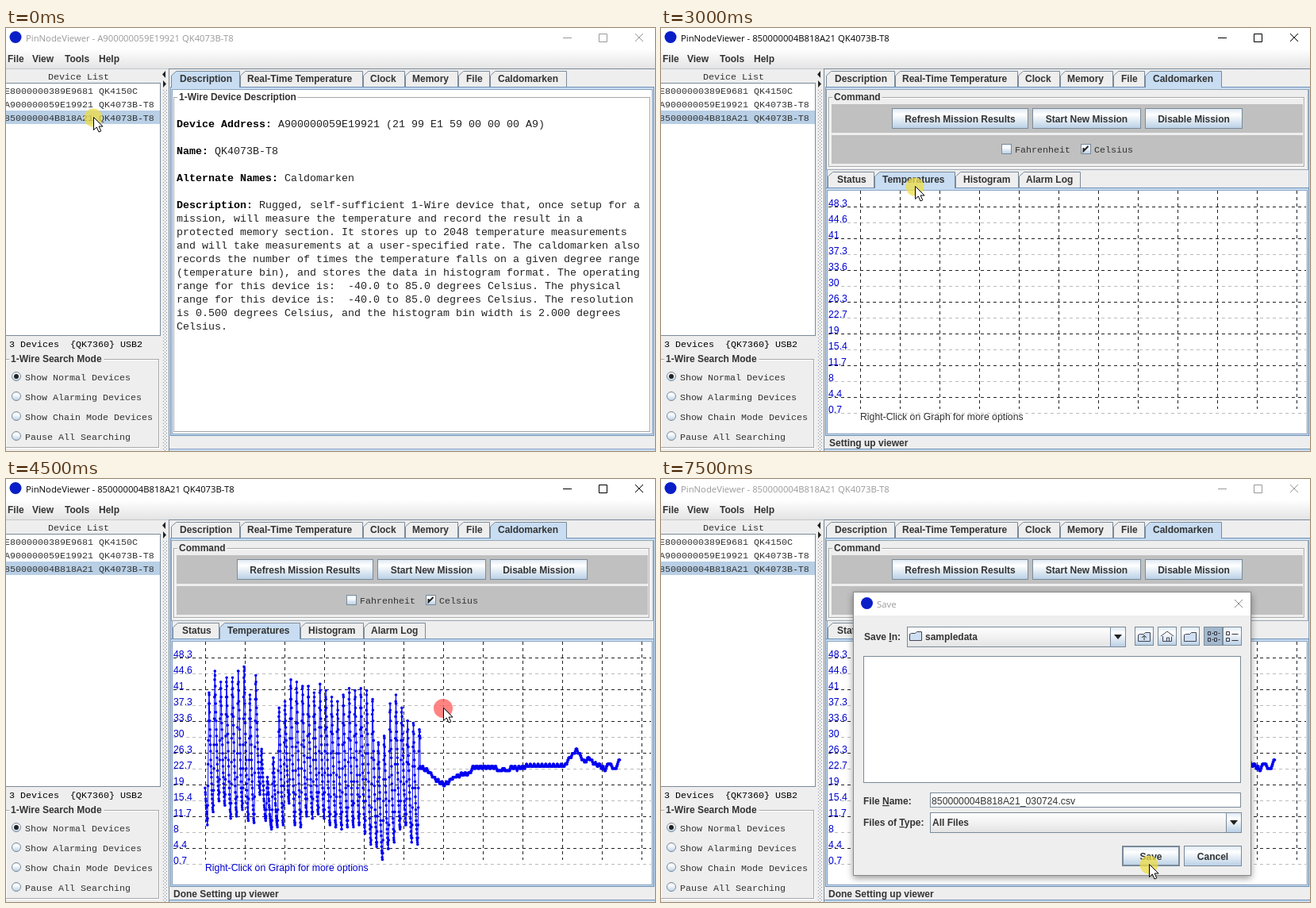
An HTML page that plays this animation: 818 px wide and 533 px high, repeating every 8 s.

```html
<!DOCTYPE html>
<html lang="en">
<head>
<meta charset="utf-8">
<title>Device viewer</title>
<style>
  html, body { margin: 0; width: 100%; height: 100%; overflow: hidden; background: #eee; }
  svg { display: block; }
  text { white-space: pre; fill: #333; font: bold 12px "Liberation Sans", Arial, sans-serif; }
  .plain { font-weight: normal; font-size: 12.25px; }
  .mono { font: 11.667px "Liberation Mono", "Courier New", monospace; }
  .cell { font: bold 11.667px "Liberation Mono", "Courier New", monospace; fill: #000; text-anchor: end; }
  .doc { font: 13.333px "Liberation Mono", "Courier New", monospace; fill: #222; }
  .doc .b { font-weight: bold; fill: #000; }
  .title { font: 11.3px "Open Sans", "Noto Sans", sans-serif; fill: #000; }
  .dim { fill: #999; }
  .dark { fill: #000; }
  .blue { fill: #0000d0; }
  .mid { text-anchor: middle; }
  .legend { stroke: #eee; stroke-width: 5px; paint-order: stroke; }
  .paper { stroke: #fff; }
  .crisp { shape-rendering: crispEdges; }
</style>
</head>
<body>
<svg id="stage" width="818" height="533" viewBox="0 0 818 533">
  <defs>
    <linearGradient id="metal" x2="0" y2="1">
      <stop offset="0" stop-color="#dde8f3"/><stop offset=".3" stop-color="#fff"/><stop offset="1" stop-color="#b8cfe5"/>
    </linearGradient>
    <linearGradient id="bar" x2="0" y2="1">
      <stop offset="0" stop-color="#fff"/><stop offset="1" stop-color="#e4e4e4"/>
    </linearGradient>
    <pattern id="grip" width="4" height="4" patternUnits="userSpaceOnUse">
      <path d="M0 0h1v1h-1zM2 2h1v1h-1z" fill="#8494a4"/>
    </pattern>
    <filter id="shadow" x="-10%" y="-10%" width="120%" height="120%">
      <feDropShadow dx="0" dy="3" stdDeviation="4" flood-opacity=".4"/>
    </filter>
  </defs>
</svg>
<script>
const LOOP = 8000, EDGE = '#7a8a99', SKY = '#c8ddf2', GRAY = '#c0c0c0';
const APP = 'PinNodeViewer', MODEL = 'QK4073B-T8', KIND = 'Caldomarken';
const times = (n, fn) => Array.from({ length: n }, (_, i) => fn(i)).join('');

// Drawing helpers; each returns SVG markup.
const text = (x, y, str, cls = '') => `<text x="${x}" y="${y}" class="${cls}">${str}</text>`;
const fill = (x, y, w, h, color) =>
  `<rect class="crisp" x="${x}" y="${y}" width="${w}" height="${h}" fill="${color}"/>`;
const box = (x, y, w, h, color = 'none', edge = EDGE) =>
  `<rect x="${x + .5}" y="${y + .5}" width="${w - 1}" height="${h - 1}" fill="${color}" stroke="${edge}"/>`;
const path = (d, stroke, color = 'none', extra = '') =>
  `<path d="${d}" stroke="${stroke}" fill="${color}" ${extra}/>`;
const disc = (x, y, r, color, edge = 'none') =>
  `<circle cx="${x}" cy="${y}" r="${r}" fill="${color}" stroke="${edge}"/>`;
const layer = (from, to, ...parts) => `<g data-span="${from} ${to}">${parts.join('')}</g>`;

const button = (x, y, w, h, label) =>
  box(x, y, w, h, 'url(#metal)') + text(x + w / 2, y + h / 2 + 5, label, 'mid');

const titled = (x, y, w, h, label, cls = '') =>
  box(x + 1, y + 1, w, h, 'none', '#fff') + box(x, y, w, h, 'none', '#a8a8a8') +
  text(x + 7, y + 4, label, 'legend ' + cls);

const tab = (x, y, w, label, textX, on) =>
  path(`M${x + .5} ${y + 20}v-14l6 -5.5h${w - 7}v19.5`, EDGE, on ? SKY : '#eee') +
  text(textX, y + 14, label);

const tabRow = (y, tabs, active) =>
  tabs.map(([x, w, label, textX], i) => tab(x, y, w, label, textX, i === active)).join('');

const pane = (x, y, w, h, color) =>
  box(x, y, w, h, SKY, '#6f8fb5') + box(x + 2, y + 3, w - 4, h - 5, color, '#8aa4c2');

const pointer = (x, y, halo = 'rgba(238,220,70,.75)', r = 11.5) =>
  disc(x, y + 1, r, halo) +
  path(`M${x + .5} ${y + .5}v16l3.8 -3.5l2.7 6l2.8 -1.2l-2.7 -5.8h5z`, '#000', '#fff');

const windowTitle = (device, cls, ink) =>
  text(25, 17, `${APP} - ${device} ${MODEL}`, 'title ' + cls) +
  path('M702 12.5h11M747.5 7.5h10v10h-10zM793 7l10 10M803 7l-10 10', ink);

const mainTabs = [
  [208, 87, 'Description', 219], [295, 155, 'Real-Time Temperature', 304], [450, 53, 'Clock', 459],
  [503, 67, 'Memory', 512], [570, 40, 'File', 580], [610, 97, KIND, 620]];
const subTabs = [
  [210, 59, 'Status', 222], [269, 102, 'Temperatures', 279],
  [371, 80, 'Histogram', 381], [451, 78, 'Alarm Log', 460]];

function frame() {
  const menu = [[2, 'File'], [33, 'View'], [74, 'Tools'], [117, 'Help']];
  const devices = ['E8000000389E9681 QK4150C', `A900000059E19921 ${MODEL}`, `850000004B818A21 ${MODEL}`];
  const modes = ['Show Normal Devices', 'Show Alarming Devices', 'Show Chain Mode Devices', 'Pause All Searching'];
  return [
    fill(0, 0, 818, 533, '#eee'), fill(0, 0, 818, 26, '#fff'), disc(12, 11.5, 7.5, '#0a1ec8'),
    fill(0, 26, 818, 25, 'url(#bar)'), fill(0, 51, 818, 1, '#c4c8cc'),
    ...menu.map(([x, label]) => text(x, 43, label)),
    text(53, 65, 'Device List', 'mono'),
    box(-2, 69, 197, 319, '#fff'), fill(0, 104, 194, 17, '#b8cfe5'),
    ...devices.map((name, i) => text(-2, 83 + 17 * i, name, 'mono')),
    text(4, 402, '3 Devices  {QK7360} USB2', 'mono dark'),
    titled(-1, 417, 194, 112, '1-Wire Search Mode'),
    ...modes.map((label, i) =>
      disc(13, 439 + 25 * i, 5.5, 'url(#metal)', EDGE) + text(24, 444 + 25 * i, label, 'mono')),
    disc(13, 439, 3, '#222'),
    fill(197, 78, 7, 455, 'url(#grip)'),
    path('M201 54v9l-4 -4.5zM198 66v9l4 -4.5z', 'none', '#222'),
    fill(205, 51, 613, 1, EDGE), fill(205, 51, 1, 482, EDGE), fill(206, 530, 612, 1, '#8aa4c2'),
    fill(206, 531, 612, 2, SKY)
  ].join('');
}

function description() {
  const lines = [
    ['Device Address:', ' A900000059E19921 (21 99 E1 59 00 00 00 A9)'], [],
    ['Name:', ` ${MODEL}`], [],
    ['Alternate Names:', ` ${KIND}`], [],
    ['Description:', ' Rugged, self-sufficient 1-Wire device that, once setup for a'],
    ['', 'mission, will measure the temperature and record the result in a'],
    ['', 'protected memory section. It stores up to 2048 temperature measurements'],
    ['', `and will take measurements at a user-specified rate. The ${KIND.toLowerCase()} also`],
    ['', 'records the number of times the temperature falls on a given degree range'],
    ['', '(temperature bin), and stores the data in histogram format. The operating'],
    ['', 'range for this device is:  -40.0 to 85.0 degrees Celsius. The physical'],
    ['', 'range for this device is:  -40.0 to 85.0 degrees Celsius. The resolution'],
    ['', 'is 0.500 degrees Celsius, and the histogram bin width is 2.000 degrees'],
    ['', 'Celsius.']];
  return pane(207, 74, 610, 440, '#fff') + tabRow(54, mainTabs, 0) + fill(209, 74, 85, 2, SKY) +
    titled(211, 87, 601, 422, '1-Wire Device Description', 'paper') +
    lines.map(([head, body], i) => head === undefined ? '' :
      text(215, 125 + 17 * i, `<tspan class="b">${head}</tspan>${body}`, 'doc')).join('');
}

function commands() {
  return pane(207, 74, 612, 457, '#eee') + tabRow(54, mainTabs, 5) + fill(611, 74, 95, 2, SKY) +
    fill(206, 514, 612, 16, '#eee') +
    box(208, 77, 608, 102, '#eee', '#9aa8b6') + titled(211, 87, 600, 88, 'Command') +
    fill(215, 96, 594, 36, GRAY) + fill(215, 135, 594, 36, GRAY) +
    button(291, 101, 172, 26, 'Refresh Mission Results') +
    button(468, 101, 137, 26, 'Start New Mission') +
    button(610, 101, 123, 26, 'Disable Mission') +
    box(429, 146, 13, 13, 'url(#metal)') + text(446, 157, 'Fahrenheit', 'mono') +
    box(529, 146, 13, 13, 'url(#metal)') + text(546, 157, 'Celsius', 'mono') +
    path('M532.5 151v4l6 -6', '#222', 'none', 'stroke-width="2"') +
    pane(207, 201, 610, 313, '#eee');
}

function statusTable() {
  const labels = ['Is Mission Active?', 'Mission Start:', 'Sample Rate:', 'Number of Mission Samples:',
    'Total Samples:', 'Roll Over Enabled?', 'Roll Over Occurred?', 'Active Alarms:',
    'Next Clock Alarm At:', 'High Temperature Alarm:', 'Low Temperature Alarm:'];
  return tabRow(181, subTabs, 0) + fill(211, 201, 57, 2, SKY) +
    box(210, 206, 603, 304, '#eee', '#aaa') +
    labels.map((label, i) => {
      const y = 210 + 27 * i;
      return fill(211, y, 299, 24, GRAY) + fill(513, y, 299, 24, GRAY) + text(503, y + 17, label, 'cell');
    }).join('');
}

function graph() {
  const dash = 'stroke-dasharray="4 4"';
  return tabRow(181, subTabs, 1) + fill(270, 201, 100, 2, SKY) + fill(211, 205, 602, 305, '#fff') +
    times(14, i => path(`M211 ${225.5 + 20 * i}H813`, i % 2 ? '#bbb' : '#222', 'none', dash)) +
    times(12, i => path(`M${251.5 + 50 * i} 205V480`, '#222', 'none', dash)) +
    times(14, i => {
      const label = String(+(48.275 - 3.657 * i).toFixed(1));
      return text(211, 225 + 20 * i, label, 'plain blue');
    });
}

// Daily swings (fast rise, slower fall), then a calm stretch; readings step by half a degree.
function readings() {
  const peaks = [268, 241, 254, 250, 249, 238, 235, 271, 247, 340, 375, 349, 288, 280, 252, 256, 258, 258, 268,
    259, 266, 274, 277, 269, 263, 267, 263, 267, 275, 330, 322, 283, 271, 288, 303, 305, 314];
  const lows = [435, 421, 406, 412, 427, 424, 417, 430, 435, 397, 430, 441, 438, 437, 410, 437, 440, 425, 428,
    424, 428, 436, 440, 442, 440, 438, 436, 447, 460, 463, 480, 468, 459, 442, 437, 458, 460];
  const calm = [[522, 363], [528, 366], [534, 370], [540, 377], [546, 382], [552, 385], [557, 383], [563, 377],
    [572, 373], [584, 371], [589, 363], [616, 363], [622, 369], [627, 365], [632, 369], [637, 363], [645, 365],
    [655, 362], [704, 362], [708, 355], [713, 349], [719, 341], [724, 349], [729, 357], [735, 351], [741, 359],
    [749, 361], [755, 367], [760, 358], [767, 367], [771, 359], [774, 352]];
  const period = 7.36, rise = 2.2, step = 2.73;
  const level = x => {
    if (x >= 522) {
      const i = Math.max(1, calm.findIndex(p => p[0] >= x));
      const [x0, y0] = calm[i - 1], [x1, y1] = calm[i];
      return y0 + (y1 - y0) * (x - x0) / (x1 - x0) + 1.5 * Math.sin(x * 1.3);
    }
    const pos = x - 256 + rise, day = Math.floor(pos / period), part = pos - day * period;
    if (day < 0) return 390 + 45 * (x - 251) / 2.8;
    if (part < rise) {
      const u = part / rise;
      return lows[day] + (peaks[day] - lows[day]) * u * u * (3 - 2 * u);
    }
    const u = (part - rise) / (period - rise), low = lows[day + 1] ?? 363;
    return low + (peaks[day] - low) * (1 - u) ** 1.5;
  };
  const points = Array.from({ length: 2048 }, (_, i) => {
    const x = 251 + i * .2553;
    return [x.toFixed(1), (485 - Math.round((485 - level(x)) / step) * step).toFixed(1)];
  });
  return path('M' + points.join('L'), '#00f') +
    path(points.map(p => `M${p}h.01`).join(''), '#0000f0', 'none', 'stroke-width="3.6" stroke-linecap="round"');
}

function popup() {
  const items = ['Copy Data to Clipboard (comma-separated)', 'Copy Data to Clipboard with Labels',
    'Copy Data to Clipboard without Labels', 'Save Data to .csv File', 'Rescale Graph'];
  return box(551, 289, 268, 110, '#eee', '#6382bf') + fill(552, 355, 266, 21, '#a3b8cc') +
    fill(552, 355, 266, 1, EDGE) +
    items.map((label, i) => text(i === 3 ? 559 : 558, 307 + 21 * i, label)).join('');
}

function saveDialog() {
  const hint = (before, key, after) => `${before}<tspan text-decoration="underline">${key}</tspan>${after}`;
  const folder = (x, y) => path(`M${x + .5} ${y + 12.5}v-8l2 -1h5l2 -2h6v11z`, '#445', '#cfe0f2');
  const combo = (x, y, w) => box(x, y, w, 26, '#eee') + fill(x + 1, y + 1, w - 2, 24, 'url(#bar)') +
    box(x + w - 20, y, 20, 26, 'url(#metal)') +
    path(`M${x + w - 15} ${y + 10}h10l-5 6z`, 'none', '#222');
  const tool = (x, color = 'url(#metal)') => box(x, 186, 24, 24, color);
  return `<g filter="url(#shadow)">${box(242, 142, 502, 358, '#eee', '#888')}</g>` + [
    fill(243, 143, 500, 29, '#fff'), disc(259.5, 156.5, 7.5, '#0a1ec8'), text(272, 162, 'Save', 'title dim'),
    path('M723 152l10 10M733 152l-10 10', '#888'),
    text(256, 203, hint('Save ', 'I', 'n:')), combo(310, 186, 276), folder(313, 191), text(333, 203, 'sampledata'),
    tool(597), tool(626), tool(655), tool(684, '#a3b8cc'), tool(708),
    folder(601, 192), path('M609 203v-6m-3 3l3 -3l3 3', '#333'),
    path('M630 198l8 -6l8 6M632.5 198v6.5h11v-6M637.5 204v-4h3v4', '#445'), folder(659, 192),
    times(4, i => path(`M${689.5 + i % 2 * 8} ${192.5 + (i >> 1) * 8}h3v4h-3zm5 2h2`, '#334')),
    times(2, i => path(`M712.5 ${192.5 + 8 * i}h4v4h-4zm7 3h8`, '#334')),
    box(255, 223, 476, 160, '#fff'),
    text(255, 410, hint('File ', 'N', 'ame:')), box(339, 395, 392, 19, '#fff'),
    text(341, 410, '850000004B818A21_030724.csv', 'plain'),
    text(255, 437, hint('Files of ', 'T', 'ype:')), combo(339, 420, 393), text(342, 437, 'All Files'),
    button(581, 462, 73, 26, 'Save'), box(582, 463, 71, 24), button(659, 462, 73, 26, 'Cancel')
  ].join('');
}

const note = (x, str) => text(x, 527, str);
const graphHint = cls => text(251, 494, 'Right-Click on Graph for more options', 'plain ' + cls);

document.getElementById('stage').innerHTML += [
  frame(),
  layer(0, 1500, windowTitle('A900000059E19921', 'dim', '#999'), description(), pointer(110, 112)),
  layer(1500, 7500, windowTitle('850000004B818A21', '', '#000')),
  layer(7500, LOOP, windowTitle('850000004B818A21', 'dim', '#999')),
  layer(1500, LOOP, commands()),
  layer(1500, 3000, statusTable(), note(211, 'No Device'), pointer(664, 67)),
  layer(3000, LOOP, graph()),
  layer(3000, 4500, graphHint(''), note(212, 'Setting up viewer'), pointer(320, 199)),
  layer(4500, LOOP, readings(), graphHint('blue'), note(211, 'Done Setting up viewer')),
  layer(4500, 6000, pointer(551, 288, 'rgba(255,100,100,.8)', 12)),
  layer(6000, 7500, popup(), pointer(694, 371)),
  layer(7500, LOOP, saveDialog(), pointer(615, 485))
].join('');

// Hard cuts: each layer is shown only inside its time span.
for (const group of document.querySelectorAll('[data-span]')) {
  const [from, to] = group.dataset.span.split(' ').map(Number);
  const steps = [[from, 1]];
  if (from > 0) steps.unshift([0, 0]);
  if (to < LOOP) steps.push([to, 0]);
  steps.push([LOOP, steps.at(-1)[1]]);
  const keys = steps.map(([time, opacity]) => ({ offset: time / LOOP, opacity, easing: 'step-end' }));
  group.animate(keys, { duration: LOOP, iterations: Infinity, fill: 'both' }).startTime = 0;
}
</script>
</body>
</html>
```
